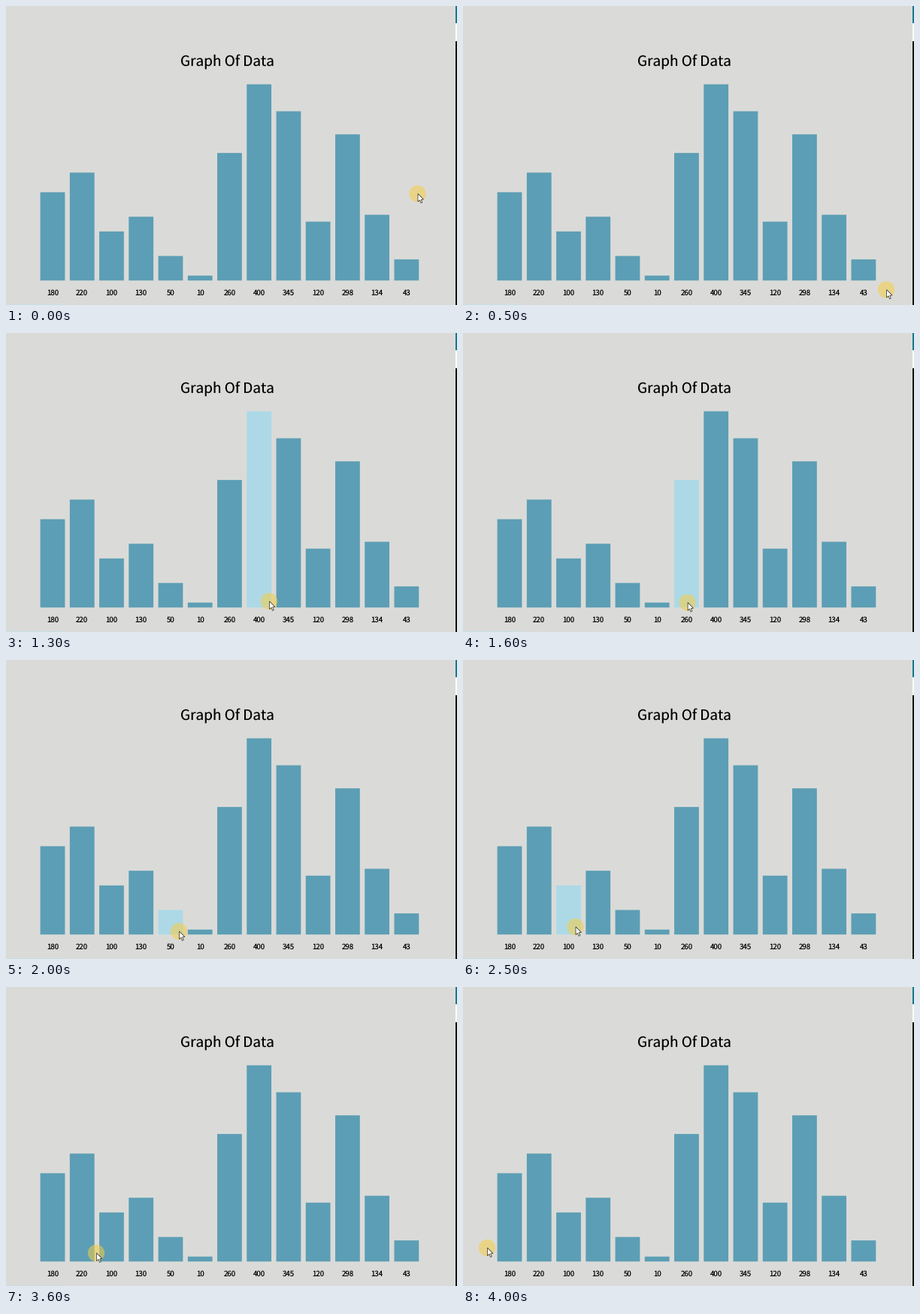
These frames come from a looping animation (600 by 399 pixels, 4.5 s). A matplotlib script:

```python
import numpy as np
import matplotlib.pyplot as plt
from matplotlib.animation import FuncAnimation
from matplotlib.patches import Circle, Polygon, Rectangle

W, H, DPI = 600, 399, 64
FRAMES, INTERVAL = 45, 100

BACKGROUND = "#dadbd8"
BAR = "#5c9eb5"
BAR_HOVER = "#add9e7"
HALO = "#f7ce45"

VALUES = [180, 220, 100, 130, 50, 10, 260, 400, 345, 120, 298, 134, 43]
LEFT, PITCH, BAR_WIDTH = 45.6, 39.24, 32.8
BASE, SCALE = 366.3, 0.6545

# The pointer swings round to the last bar, then glides along the bases
SWING_END = 6
SWING = np.array([(548, 250.5), (629, 450), (538, 355)])
STOPS = [(SWING_END, *SWING[-1]), (9, 456, 352), (13, 350.5, 358),
         (20, 230.5, 362), (24.5, 150, 356), (27, 150, 356), (30, 210.5, 352),
         (33, 194, 353), (36, 120.5, 355), (39, 41, 352), (40, 32.5, 348)]

plt.rcParams["font.family"] = "Noto Sans CJK JP"
plt.rcParams["text.hinting"] = "none"


def points(px):
    return px * 72 / DPI


def rect(x, y, w, h, color):
    return ax.add_patch(Rectangle((x, y), w, h, facecolor=color, linewidth=0,
                                  snap=False))


def label(x, y, text, px):
    ax.text(x, y, text, fontsize=points(px), color="black",
            ha="center", va="baseline")


def pointer(frame):
    if frame < SWING_END:
        t = frame / SWING_END
        a, b, c = SWING
        return (1 - t) ** 2 * a + 2 * t * (1 - t) * b + t ** 2 * c
    times, xs, ys = zip(*STOPS)
    return np.array([np.interp(frame, times, xs), np.interp(frame, times, ys)])


def contains(bar, x, y):
    left, top = bar.get_xy()
    return (left <= x <= left + bar.get_width()
            and top <= y <= top + bar.get_height())


fig = plt.figure(figsize=(W / DPI, H / DPI), dpi=DPI, facecolor=BACKGROUND)
ax = fig.add_axes([0, 0, 1, 1])
ax.set_xlim(0, W)
ax.set_ylim(H, 0)
ax.axis("off")

# Slivers of the window behind the chart
rect(598, 0, 2, 23, "#17788f")
rect(598, 23, 2, 24, "#ffffff")
rect(598, 47, 2, H - 47, "#111111")
rect(0, 398, 78, 1, "#c6dde4")

label(294.2, 80, "Graph Of Data", 19)

bars = []
for i, value in enumerate(VALUES):
    x = LEFT + i * PITCH
    height = value * SCALE
    bars.append(rect(x, BASE - height, BAR_WIDTH, height, BAR))
    label(x + BAR_WIDTH / 2, 385.6, str(value), 9.7)

halo = ax.add_patch(Circle((0, 0), 11.2, facecolor=HALO, alpha=0.55,
                           linewidth=0, zorder=4))
ARROW = np.array([(0, 0), (0, 10.6), (2.5, 8.4), (4, 12.4),
                  (5.8, 11.6), (4.2, 7.8), (7.4, 7.5)])
arrow = ax.add_patch(Polygon(ARROW, facecolor="white", edgecolor="#222222",
                             linewidth=points(0.7), zorder=5))


def draw(frame):
    x, y = pointer(frame)
    for bar in bars:
        bar.set_facecolor(BAR_HOVER if contains(bar, x, y) else BAR)
    halo.center = (x - 0.5, y)
    arrow.set_xy(ARROW + (x, y))
    return [*bars, halo, arrow]


anim = FuncAnimation(fig, draw, frames=FRAMES, interval=INTERVAL,
                     init_func=lambda: draw(0), repeat=True, repeat_delay=0)
plt.show()
```
